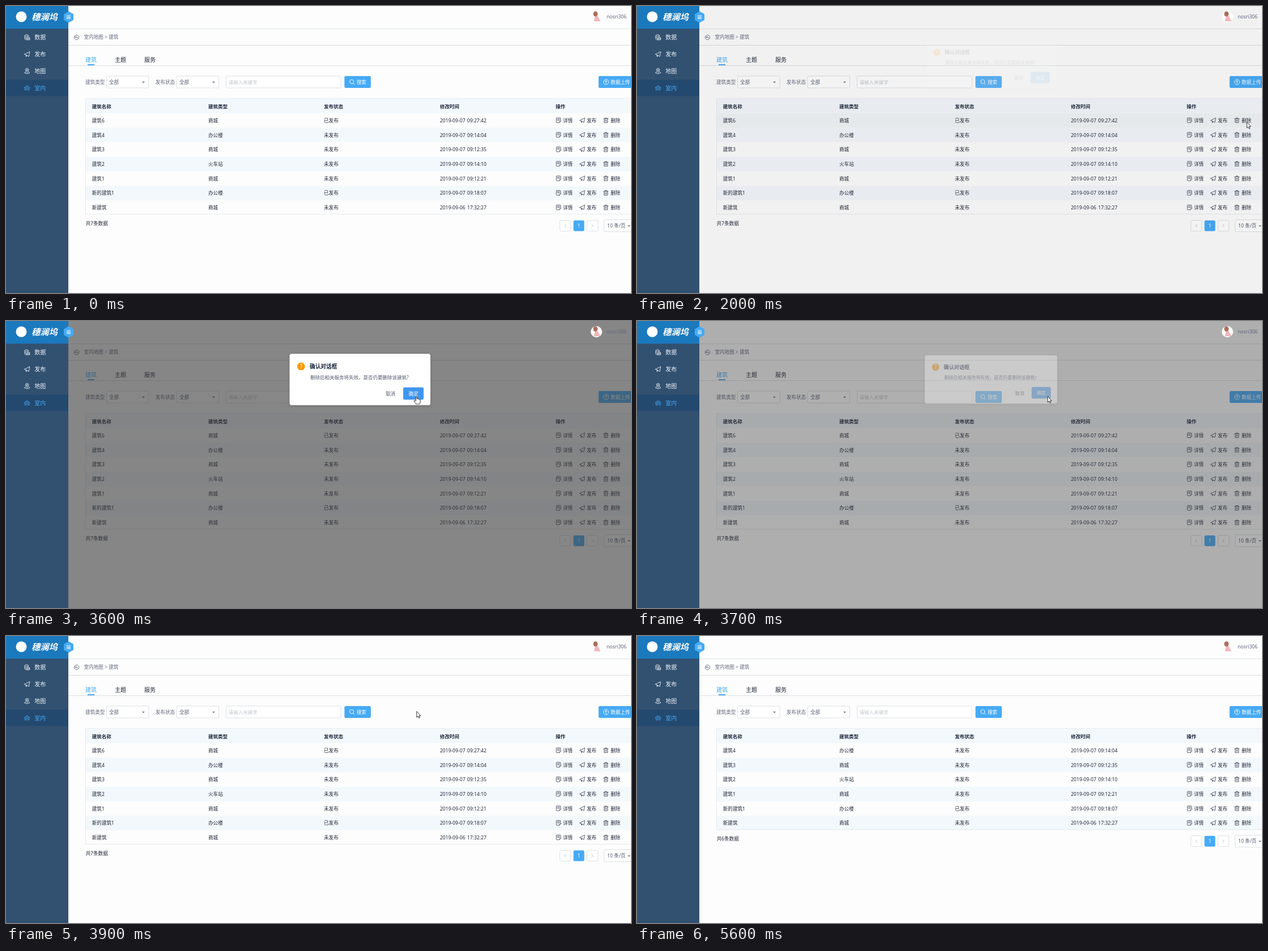
An HTML page for the animation above (5900 ms loop, 1103 by 508 pixels).

```html
<!DOCTYPE html>
<html lang="zh-CN">
<head>
<meta charset="utf-8">
<title>建筑列表</title>
<style>
  html, body { margin: 0; width: 100%; height: 100%; overflow: hidden; background: #fdfdfd; }
  svg { display: block; width: 1103px; height: 508px; }
  text { font-family: "Noto Sans", "Noto Sans CJK SC", "Noto Sans CJK", sans-serif; white-space: pre; }
</style>
</head>
<body>
<svg id="stage" viewBox="0 0 1103 508" xmlns="http://www.w3.org/2000/svg"></svg>
<script>
const BLUE = '#46aaf5', INK = '#222939', GREY = '#666b80', LINE = '#dcdfe4';
const LOOP = 5900, STEP = 100, ROW = 25.7, ROWS_TOP = 189.7;

// Markup helpers; text is placed by its left edge and vertical centre.
const text = (x, cy, s, fill = INK, size = 8.6, extra = '') =>
  `<text x="${x}" y="${cy + size * .38}" font-size="${size}" fill="${fill}" ${extra}>${s}</text>`;
const rect = (x, y, w, h, fill, extra = '') =>
  `<rect x="${x}" y="${y}" width="${w}" height="${h}" fill="${fill}" ${extra}/>`;
const box = (x, y, w, h, fill = '#fff', stroke = LINE) => rect(x, y, w, h, fill, `rx="2" stroke="${stroke}"`);
const button = (x, y, w, h) => rect(x, y, w, h, BLUE, 'rx="2.2"');
const hline = (x, y, color) => rect(x, y, 1103 - x, 1, color);
const caret = (x, y) => `<path d="M${x - 2.6} ${y - 1.2}h5.2l-2.6 2.8z" fill="#777b86"/>`;
const icon = (name, cx, cy, color, scale = 1) =>
  `<path transform="translate(${cx} ${cy}) scale(${scale})" d="${ICONS[name]}" fill="none" stroke="${color}"
    stroke-width=".9" stroke-linejoin="round" stroke-linecap="round"/>`;
const group = (id, content) => `<g id="${id}">${content}</g>`;

const ICONS = {
  data: 'M-4 -3c0-2 6-2 6 0s-6 2-6 0v6c0 1 2 1.6 3.5 1.5M2 -3v2.5M-4 0c0 1 1.6 1.6 3 1.6M0 .5h4.5v4h-4.5zM0 2.5h4.5',
  plane: 'M-4.7 .2L4.6 -4.4L3 4L-4.7 .2M-1.8 1.7V4.6L0 2.6',
  map: 'M0 2.4c-5-5-2.5-7 0-7s5 2 0 7zM-1.2 -1.6a1.2 1.2 0 1 0 2.4 0a1.2 1.2 0 1 0-2.4 0M-2.6 1L-4.6 3.2L0 4.8L4.6 3.2L2.6 1',
  house: 'M-4.8 -.4L0 -4.2L4.8 -.4M-3.6 -.8v5M3.6 -.8v5M-1.6 4.2v-3h3.2v3M-1.8 -1.2h3.6',
  detail: 'M4 -.5v-3q0-1-1-1h-6q-1 0-1 1v7q0 1 1 1h3M-2.2 -2.2h4.4M-2.2 0h4.4M1.2 4.4l.3-1.5l2.6-2.5l1 1l-2.6 2.6z',
  trash: 'M-4.2 -2.8h8.4M-1.6 -2.8v-1.6h3.2v1.6M-3.2 -2.8v7.2h6.4v-7.2M-1.1 -.7v3M1.1 -.7v3',
  search: 'M-4 -.6a3.6 3.6 0 1 0 7.2 0a3.6 3.6 0 1 0-7.2 0M2.2 2.2L4.4 4.4',
  upload: 'M-4.6 0a4.6 4.6 0 1 0 9.2 0a4.6 4.6 0 1 0-9.2 0M0 2.5v-5M-2 -.7L0 -2.6L2 -.7',
  back: 'M-4.2 0a4.2 4.2 0 1 0 8.4 0a4.2 4.2 0 1 0-8.4 0M-.8 -2L-2.4 -.4L-.8 1.2M-2.4 -.4h3q1.6 0 1.6 2',
  left: 'M1.2 -2.2L-1.2 0L1.2 2.2',
  right: 'M-1.2 -2.2L1.2 0L-1.2 2.2',
};

const BUILDINGS = [
  ['建筑6', '商城', '已发布', '2019-09-07 09:27:42'],
  ['建筑4', '办公楼', '未发布', '2019-09-07 09:14:04'],
  ['建筑3', '商城', '未发布', '2019-09-07 09:12:35'],
  ['建筑2', '火车站', '未发布', '2019-09-07 09:14:10'],
  ['建筑1', '商城', '未发布', '2019-09-07 09:12:21'],
  ['新的建筑1', '办公楼', '已发布', '2019-09-07 09:18:07'],
  ['新建筑', '商城', '未发布', '2019-09-06 17:32:27'],
];
const COLUMNS = [151.7, 357, 561, 765.7, 970];

function tableRow(cells, i) {
  const top = ROWS_TOP + i * ROW, cy = top + ROW / 2;
  const actions = [['detail', 975, 983, '详情'], ['plane', 1017, 1025, '发布'], ['trash', 1058.7, 1067, '删除']];
  return (i % 2 ? rect(141, top, 962, ROW, '#f3f8fd') : '')
    + cells.map((s, c) => text(COLUMNS[c], cy, s, INK, 8.6, 'word-spacing="1"')).join('')
    + actions.map(([name, ix, tx, s]) => icon(name, ix, cy - .3, '#3d4454', .95) + text(tx, cy, s)).join('');
}

function listView(rows) {
  const bottom = ROWS_TOP + rows.length * ROW, mid = bottom + 19.3;
  return rows.map(tableRow).join('')
    + rect(140, 163, 1, bottom - 163, '#e6eaee') + hline(140, Math.floor(bottom) - 1, '#e6eaee')
    + text(140.5, bottom + 15.3, `共${rows.length}条数据`)
    + box(977.5, mid - 9.5, 19, 19) + icon('left', 987, mid, '#b9bdc6')
    + button(1001.5, mid - 9.5, 19, 19) + text(1008.6, mid, '1', '#fff')
    + box(1025.5, mid - 9.5, 19, 19) + icon('right', 1035, mid, '#b9bdc6')
    + box(1055.5, mid - 10.5, 60, 21) + text(1061, mid, '10 条/页', '#515a6e') + caret(1099.5, mid + .5);
}

function pageFrame() {
  const heads = ['建筑名称', '建筑类型', '发布状态', '修改时间', '操作'];
  return rect(110, 0, 993, 508, '#fdfdfd')
    + hline(110, 40, '#dfe1e4') + hline(110, 69, '#d9dce0') + hline(110, 105, '#dcdfe3')
    + icon('back', 124.5, 55.5, GREY) + text(137.5, 55.2, '室内地图 &gt; 建筑', GREY)
    + text(140, 95.2, '建筑', BLUE, 10) + text(192, 95.2, '主题', INK, 10) + text(244, 95.2, '服务', INK, 10)
    + rect(144, 103, 12, 2, BLUE)
    + text(140, 134.7, '建筑类型', GREY) + box(177.5, 124, 74.5, 21) + text(182, 134.5, '全部', '#515a6e') + caret(242.5, 135)
    + text(263.7, 134.7, '发布状态', GREY) + box(301, 124, 74.5, 21) + text(306, 134.5, '全部', '#515a6e') + caret(366.5, 135)
    + box(388.5, 124, 202.5, 21) + text(392.5, 134.7, '请输入关键字', '#c2c5cc', 8.5)
    + button(597.3, 124, 46.5, 21) + icon('search', 610.5, 134.5, '#fff') + text(618.7, 134.5, '搜索', '#fff')
    + button(1045.8, 124, 64, 21) + icon('upload', 1059, 134.5, '#fff') + text(1067, 134.5, '数据上传', '#fff')
    + rect(140, 163, 963, ROWS_TOP - 163, '#f3f8fd') + hline(140, 163, '#e9eef3')
    + heads.map((s, c) => text(COLUMNS[c], 177.4, s, '#20283a', 8.5, 'font-weight="700"')).join('');
}

function sidebar() {
  const items = [['data', '数据'], ['plane', '发布'], ['map', '地图'], ['house', '室内']];
  return rect(0, 0, 110, 508, '#325171') + rect(0, 0, 110, 40, '#1b79bd')
    + rect(0, 130.5, 110, 29, '#24496f')
    + '<circle cx="27" cy="19" r="9.5" fill="#fff"/>'
    + text(45, 19, '穗澜坞', '#fff', 15.3, 'font-weight="900" font-style="italic"')
    + items.map(([name, s], i) => {
        const color = i === 3 ? BLUE : '#eef3f8', cy = 55.3 + i * 29.9;
        return icon(name, 37.2, cy, color) + text(50.2, cy, s, color, 10);
      }).join('')
    + `<path d="M110.5 9.5l8.5 4.8v10.4l-8.5 4.8l-8.5-4.8v-10.4z" fill="${BLUE}"/>`
    + '<path d="M107 17h7M107 19.6h7M107 22.2h7" stroke="#fff" stroke-width="1.2"/>';
}

const user = () => '<circle cx="1042" cy="19" r="10" fill="#fdfdfd"/>'
  + '<path d="M1040 16.5l4.5 1.5l4.5 9h-11.5z" fill="#f2b6bb"/>'
  + '<ellipse cx="1040.3" cy="14" rx="4" ry="4.6" fill="#a9705c"/>'
  + text(1060, 19, 'nosri306', '#60667e');

const dialog = () => rect(500.5, 58, 248.5, 91, '#fff', 'rx="4" filter="url(#shade)"')
  + '<circle cx="520.7" cy="80.3" r="6.9" fill="#ff9900"/>'
  + text(518.4, 80.2, '?', '#fff', 10.5)
  + text(536, 80, '确认对话框', '#17233d', 9.7, 'font-weight="700"')
  + text(537, 99.3, '删除后相关服务将失效，是否仍要删除该建筑?', '#515a6e', 8.5)
  + text(670, 129, '取消', '#515a6e')
  + rect(701, 117.5, 36, 21.8, BLUE, 'rx="2.2" id="confirm"')
  + text(710.6, 128.7, '确定', '#fff', 8.6, 'font-weight="500"');

const toast = () => rect(588, 13, 74, 24, '#fff', 'rx="3" filter="url(#shade)"')
  + '<circle cx="605" cy="25" r="5" fill="#19be6b"/>'
  + '<path d="M602.7 25l1.7 1.8l3-3.4" fill="none" stroke="#fff"/>'
  + text(613.5, 25, '删除成功', '#515a6e');

const outlined = (id, d) => `<path id="${id}" d="${d}" fill="#fff" stroke="#222" stroke-width=".9" stroke-linejoin="round"/>`;
const cursor = () => outlined('arrow', 'M.3 .3V11L2.6 8.9L4.2 12.3L5.8 11.6L4.3 8.3H7.2z')
  + outlined('hand', 'M-1.2 8.4V1.2Q-1.2 .3 -.2 .3T.8 1.2V4.8Q2.6 4 3 5.2Q4.5 4.6 5 5.8Q6.6 5.4 6.6 7V9.8Q6.6 11.6 5.4 14H-.8Q-2 12 -4.4 9Q-4.8 7.6 -3.2 7.6z');

const stage = document.getElementById('stage');
stage.innerHTML = `<defs><filter id="shade" x="-20%" y="-30%" width="140%" height="160%">
    <feDropShadow dx="0" dy="1" stdDeviation="2" flood-opacity=".2"/></filter></defs>`
  + pageFrame()
  + group('hover', rect(141, ROWS_TOP, 962, ROW, '#f0f4f6'))
  + group('before', listView(BUILDINGS)) + group('after', listView(BUILDINGS.slice(1)))
  + rect(110, 0, 993, 508, '#373737', 'id="mask"')
  + sidebar() + user()
  + group('dialog', dialog()) + group('toast', toast()) + group('cursor', cursor());

const part = Object.fromEntries([...stage.querySelectorAll('[id]')].map(el => [el.id, el]));
const show = (el, on) => el.setAttribute('display', on ? 'inline' : 'none');

// Tracks hold [tick, values...]; one tick is a tenth of a second.
const MASK = [[19, 0], [20, .058], [21, .36], [22, .6], [36, .6], [37, .4], [38, .16], [39, 0]];
const DIALOG = [[19, 0, .9], [20, .1, .92], [21, .8, .98], [22, 1, 1], [36, 1, 1], [37, .35, .94], [38, 0, .9]];
const TOAST = [[39, 0], [40, .3], [41, .85], [42, 1], [54, 1], [55, .4], [56, 0]];
const POINTER = [[1, 968, 27], [6, 1063, 171], [11, 1076, 205], [23, 1076, 205], [29, 753, 155], [34, 724.5, 133],
  [48, 724.5, 133], [49, 786, 131], [50, 945, 75], [51, 968, 65], [53, 1083, 43]];

function sample(track, tick) {
  const next = track.findIndex(key => key[0] > tick);
  if (next === 0) return track[0].slice(1);
  if (next < 0) return track[track.length - 1].slice(1);
  const a = track[next - 1], b = track[next];
  const u = (tick - a[0]) / (b[0] - a[0]), ease = u * (2 - u);
  return a.slice(1).map((v, i) => v + (b[i + 1] - v) * ease);
}

function render(ms) {
  const tick = Math.floor((ms % LOOP) / STEP);
  const within = (from, to) => tick >= from && tick < to;

  show(part.hover, within(8, 22));
  show(part.before, tick < 41);
  show(part.after, tick >= 41);
  part.mask.setAttribute('opacity', sample(MASK, tick)[0]);

  const [alpha, scale] = sample(DIALOG, tick);
  part.dialog.setAttribute('opacity', alpha);
  part.dialog.setAttribute('transform', `translate(624.7 104) scale(${scale}) translate(-624.7 -104)`);
  part.confirm.setAttribute('fill', tick >= 36 ? '#4096ee' : BLUE);

  const [glow] = sample(TOAST, tick);
  part.toast.setAttribute('opacity', glow);
  part.toast.setAttribute('transform', `translate(0 ${(glow - 1) * 24})`);

  const [x, y] = sample(POINTER, tick);
  const pressing = within(10, 20) || within(33, 37);
  show(part.cursor, within(1, 54));
  show(part.hand, pressing);
  show(part.arrow, !pressing);
  part.cursor.setAttribute('transform', `translate(${x} ${y})`);
}

const start = performance.now();
function loop() {
  render(performance.now() - start);
  requestAnimationFrame(loop);
}
loop();
</script>
</body>
</html>
```
